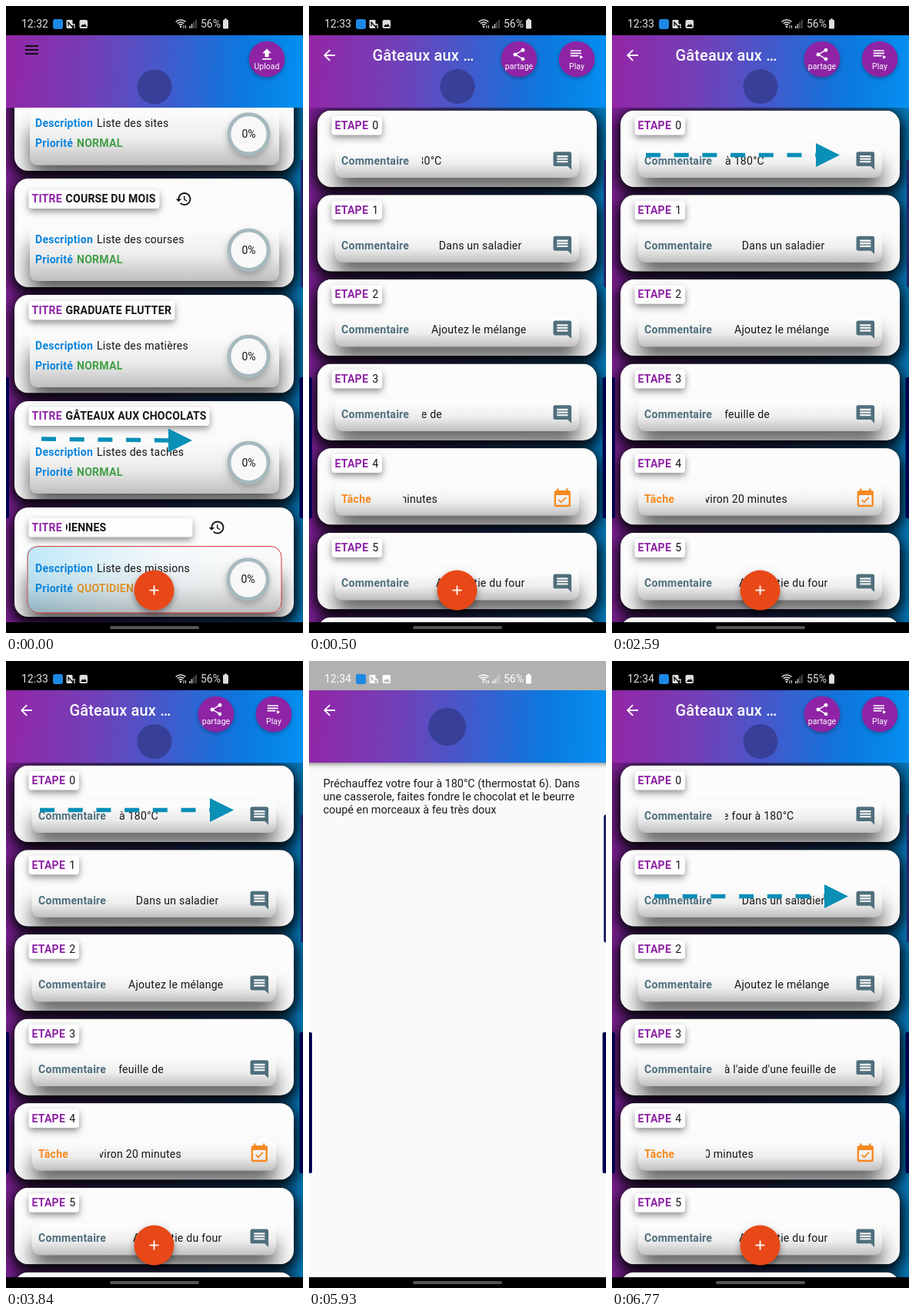
Write an HTML page with a canvas that moves like this. It is 386x814 px and loops after 8000 ms.

```html
<!DOCTYPE html>
<html lang="fr">
<head>
<meta charset="utf-8">
<title>Liste de tâches</title>
<style>
html, body { margin: 0; width: 100%; height: 100%; overflow: hidden; background: #000; }
canvas { display: block; width: 386px; height: 814px; }
</style>
</head>
<body>
<canvas id="stage"></canvas>
<script>
const W = 386, H = 814, LOOP = 8000;
const canvas = document.getElementById('stage');
const c = canvas.getContext('2d');
const dpr = window.devicePixelRatio || 1;
canvas.width = W * dpr;
canvas.height = H * dpr;
c.scale(dpr, dpr);

const PURPLE = '#8e24a5', BLUE = '#0a84dc', GREEN = '#43a047', AMBER = '#dd9330',
  ORANGE = '#f5891f', SLATE = '#4f6f7d', INK = '#161616', WHITE = '#fff';

// 24-unit icon outlines
const ICON = {
  history: 'M13 3c-4.97 0-9 4.03-9 9H1l3.89 3.89.07.14L9 12H6c0-3.87 3.13-7 7-7s7 3.13 7 7-3.13 7-7 7c-1.93 0-3.68-.79-4.94-2.06l-1.42 1.42C8.27 19.99 10.51 21 13 21c4.97 0 9-4.03 9-9s-4.03-9-9-9zm-1 5v5l4.28 2.54.72-1.21-3.5-2.08V8z',
  upload: 'M9 16h6v-6h4l-7-7-7 7h4zm-4 2h14v2H5z',
  play: 'M19 9H2v2h17zm0-4H2v2h17zM2 15h13v-2H2zm15-2v6l5-3z',
  back: 'M20 11H7.83l5.59-5.59L12 4l-8 8 8 8 1.41-1.41L7.83 13H20z',
  comment: 'M22 4c0-1.1-.9-2-2-2H4c-1.1 0-2 .9-2 2v12c0 1.1.9 2 2 2h14l4 4zM18 14H6v-2h12zm0-3H6V9h12zm0-3H6V6h12z',
  event: 'M16.53 11.06L15.47 10l-4.88 4.88-2.12-2.12-1.06 1.06L10.59 17zM19 3h-1V1h-2v2H8V1H6v2H5c-1.1 0-2 .9-2 2v14c0 1.1.9 2 2 2h14c1.1 0 2-.9 2-2V5c0-1.1-.9-2-2-2zm0 16H5V8h14z'
};
for (const name in ICON) ICON[name] = new Path2D(ICON[name]);

function box(x, y, w, h, r, fill) {
  c.beginPath();
  c.roundRect(x, y, w, h, r);
  c.fillStyle = fill;
  c.fill();
}

function disc(x, y, r, fill) {
  c.beginPath();
  c.arc(x, y, r, 0, Math.PI * 2);
  c.fillStyle = fill;
  c.fill();
}

function line(points, color, width) {
  c.beginPath();
  points.forEach(([x, y]) => c.lineTo(x, y));
  c.strokeStyle = color;
  c.lineWidth = width;
  c.stroke();
}

function shadow(color, blur, dy, draw) {
  c.save();
  c.shadowColor = color;
  c.shadowBlur = blur * dpr;
  c.shadowOffsetY = dy * dpr;
  draw();
  c.restore();
}

function gradient(x0, y0, x1, y1, ...stops) {
  const g = c.createLinearGradient(x0, y0, x1, y1);
  stops.forEach(([at, color]) => g.addColorStop(at, color));
  return g;
}

// y is the middle of the capitals
function text(s, x, y, color = INK, { weight = 400, size = 14.07, space = 0.234, align = 'left' } = {}) {
  c.font = `${weight} ${size}px Roboto, sans-serif`;
  c.letterSpacing = space + 'px';
  c.textAlign = align;
  c.fillStyle = color;
  c.fillText(s, x, y + size * 0.355);
}

const bold = (s, x, y, color, align) => text(s, x, y, color, { weight: 700, align });

function icon(name, cx, cy, scale, color) {
  c.save();
  c.translate(cx - 12 * scale, cy - 12 * scale);
  c.scale(scale, scale);
  c.fillStyle = color;
  c.fill(ICON[name], 'evenodd');
  c.restore();
}

function clipped(x, y, w, h, r, draw) {
  c.save();
  c.beginPath();
  c.roundRect(x, y, w, h, r);
  c.clip();
  draw();
  c.restore();
}

function statusBar(time, battery, bg) {
  c.fillStyle = bg;
  c.fillRect(0, 0, W, 38);
  const fg = bg === '#000' ? '#dedede' : WHITE;
  const plain = { size: 14, space: 0 };
  text(time, 20, 23.5, fg, plain);
  box(61, 17, 13, 13, 3, '#1e88e5');

  box(78.5, 18, 8, 11, 1, fg);
  line([[81, 26], [81, 21], [88, 29]], bg, 1.2);
  line([[85, 24], [89, 24], [89, 29]], fg, 1.3);

  box(95.5, 18, 10.5, 11, 2, fg);
  c.beginPath();
  c.moveTo(97, 27); c.lineTo(99.5, 23.5); c.lineTo(101, 25); c.lineTo(102.5, 23); c.lineTo(105, 27);
  c.fillStyle = bg;
  c.fill();

  for (const r of [3, 6, 9]) {
    c.beginPath();
    c.arc(227, 27, r, -2.35, -0.79);
    c.strokeStyle = fg;
    c.lineWidth = 1.5;
    c.stroke();
  }
  disc(227, 27, 1.3, fg);
  line([[231, 25], [231, 29]], fg, 1);
  line([[233.5, 25], [233.5, 29]], fg, 1);
  for (let i = 0; i < 4; i++) {
    c.globalAlpha = i < 2 ? 0.9 : 0.4;
    c.fillStyle = fg;
    c.fillRect(238 + i * 2.7, 26 - i * 2.7, 1.6, 3 + i * 2.7);
  }
  c.globalAlpha = 1;
  text(battery, 253, 23.5, fg, plain);
  box(282, 18, 7, 11.5, 1, fg);
  c.fillStyle = fg;
  c.fillRect(284, 16.5, 3, 2);
}

function header(logoX, logoY, r) {
  c.fillStyle = gradient(0, 40, W, 62, [0, '#9326a6'], [0.3, '#7240b8'], [0.55, '#405bcc'],
    [0.8, '#0b78df'], [1, '#058ff0']);
  c.fillRect(0, 38, W, 94);
  disc(logoX, logoY, r, '#383f98');
}

function roundButton(x, label, name) {
  shadow('rgba(0,0,0,.3)', 5, 2, () => disc(x, 69, 23.3, PURPLE));
  icon(name, x, 63, 0.83, WHITE);
  text(label, x, 78, WHITE, { size: 10.5, space: 0.05, align: 'center' });
}

function backdrop() {
  c.fillStyle = gradient(0, 0, W, 0, [0, '#7c1e92'], [0.5, '#3c3f98'], [1, '#0277b6']);
  c.fillRect(0, 132, W, 668);
}

function sideHandles() {
  box(-4, 482, 8, 183, 2, '#00004e');
  box(381.5, 482, 9, 183, 2, '#00004e');
  box(383, 199.5, 8, 166, 3, '#23246c');
}

function navBar() {
  c.fillStyle = '#000';
  c.fillRect(0, 800, W, 14);
  box(135, 805, 116, 4, 2, '#555');
}

function addButton() {
  shadow('rgba(0,0,0,.4)', 8, 4, () => disc(192.5, 758.5, 26, '#e84817'));
  line([[186.5, 758.5], [198.5, 758.5]], WHITE, 1.8);
  line([[192.5, 752.5], [192.5, 764.5]], WHITE, 1.8);
}

function cardShadows(cards) {
  for (let pass = 0; pass < 2; pass++)
    for (const [top, h] of cards)
      shadow('rgba(0,0,0,.9)', 20, 6, () => box(11, top, 363, h, 18, '#000'));
}

// White card holding a raised, shaded panel
function card(top, h, panel, tint = '#fbfbfb') {
  const [x, y, w, ph] = panel;
  clipped(11, top, 363, h, 18, () => {
    c.fillStyle = '#fcfcfc';
    c.fillRect(11, top, 363, h);
    shadow('rgba(0,0,0,.68)', 26, 15, () => box(x, y + ph * 0.25, w, ph * 0.75, 9, '#888'));
    box(x, y, w, ph, 9, tint);
    box(x, y, w, ph, 9, gradient(0, y, 0, y + ph, [0.2, 'rgba(0,0,0,0)'], [0.6, 'rgba(0,0,0,.06)'], [1, 'rgba(0,0,0,.24)']));
  });
}

function chip(y, w) {
  shadow('rgba(0,0,0,.42)', 9, 4, () => box(29.5, y - 12, w, 24.5, 4, '#fdfdfd'));
}

function arrow(x, y, len, slope) {
  const color = '#0a8fb6', end = y + slope;
  c.setLineDash([19, 17.7]);
  line([[x, y], [x + len, end]], color, 5.5);
  c.setLineDash([]);
  c.beginPath();
  c.moveTo(x + len, end - 15.5);
  c.lineTo(x + len + 31, end);
  c.lineTo(x + len, end + 15.5);
  c.fillStyle = color;
  c.fill();
}

const LISTS = [
  { top: 100, bottom: 214, desc: 152.5, note: 'Liste des sites' },
  { top: 224, bottom: 365, title: 250.5, name: 'COURSE DU MOIS', chip: 170, desc: 303, note: 'Liste des courses', clock: 231 },
  { top: 375, bottom: 502.5, title: 395, name: 'GRADUATE FLUTTER', chip: 190, desc: 441, note: 'Liste des matières' },
  { top: 513, bottom: 640.5, title: 532.5, name: 'GÂTEAUX AUX CHOCOLATS', chip: 235, desc: 579, note: 'Listes des taches' },
  { top: 651, bottom: 793, title: 677, name: 'TÂCHES QUOTIDIENNES', chip: 213, desc: 730.5, note: 'Liste des missions', clock: 274, daily: true }
];

function listCard({ top, bottom, title, name, chip: w, desc, note, clock, daily }) {
  const tint = daily ? gradient(28, 0, 358, 0, [0, '#bfe8f8'], [0.3, '#dff2f9'], [0.55, '#f4f8fa'], [1, '#fafafa']) : undefined;
  card(top, bottom - top, daily ? [27, desc - 29, 331, 86] : [31, desc - 29, 324, 83], tint);
  if (daily) {
    c.beginPath();
    c.roundRect(28, 701.5, 330, 86.5, 14);
    c.strokeStyle = '#d8383c';
    c.lineWidth = 1;
    c.stroke();
  }
  if (title) {
    chip(title, w);
    bold('TITRE', 33.5, title, PURPLE);
    if (daily) clipped(78, title - 10, 160, 20, 0, () => bold(name, 130.5, title, INK, 'right'));
    else bold(name, 77.5, title, INK);
  }
  if (clock) icon('history', clock, title, 0.94, INK);
  bold('Description', 38, desc, BLUE);
  text(note, 118, desc);
  bold('Priorité', 38, desc + 25.6, BLUE);
  bold(daily ? 'QUOTIDIEN' : 'NORMAL', 92, desc + 25.6, daily ? AMBER : GREEN);
  const rx = daily ? 314.5 : 315.5, ry = desc + 13.8;
  shadow('rgba(0,0,0,.28)', 10, 4, () => disc(rx, ry, 27.5, '#f8f8f8'));
  c.beginPath();
  c.arc(rx, ry, 25.6, 0, Math.PI * 2);
  c.strokeStyle = '#a6b9be';
  c.lineWidth = 4.8;
  c.stroke();
  text('0%', rx, ry, INK, { align: 'center', size: 14, space: 0 });
}

function listPage() {
  backdrop();
  cardShadows(LISTS.map(l => [l.top, l.bottom - l.top]));
  sideHandles();
  LISTS.forEach(listCard);
  header(193, 105, 22.5);
  for (const y of [52, 57, 62]) line([[25, y], [42, y]], '#111', 2);
  roundButton(339, 'Upload', 'upload');
  arrow(46, 562, 165, 2);
  addButton();
  statusBar('12:32', '56%', '#000');
  navBar();
}

const STEPS = [
  'Préchauffez votre four à 180°C',
  'Dans un saladier',
  'Ajoutez le mélange',
  "à l'aide d'une feuille de",
  'Cuire environ 20 minutes',
  'A la sortie du four',
  ''
];
const PITCH = 109.65;

// ends: right edge of each step's scrolling text
function recipePage(time, battery, ends, pointer) {
  backdrop();
  cardShadows(STEPS.map((_, i) => [135.5 + i * PITCH, 99.5]));
  sideHandles();
  STEPS.forEach((step, i) => {
    const dy = i * PITCH, y = 201 + dy, task = i === 4;
    card(135.5 + dy, 99.5, [34, 180 + dy, 317, 43]);
    chip(155 + dy, 65.5);
    bold('ETAPE', 33.5, 155 + dy, PURPLE);
    text(String(i), 82.3, 155 + dy);
    bold(task ? 'Tâche' : 'Commentaire', 42, y, task ? ORANGE : SLATE);
    clipped(task ? 122 : 147, y - 12, 160, 24, 0, () =>
      text(step, ends[i], y, INK, { align: 'right' }));
    icon(task ? 'event' : 'comment', 329.3, y, 1.18, task ? ORANGE : SLATE);
  });
  header(193, 104.5, 22.5);
  icon('back', 26.5, 64, 0.94, WHITE);
  text('Gâteaux aux …', 82.5, 64, WHITE, { weight: 500, size: 20, space: 0.15 });
  roundButton(273, 'partage', 'upload_share');
  roundButton(348, 'Play', 'play');
  if (pointer) arrow(pointer[0], pointer[1], 221, 0);
  addButton();
  statusBar(time, battery, '#000');
  navBar();
}
ICON.upload_share = new Path2D('M18 16.08c-.76 0-1.44.3-1.96.77L8.91 12.7c.05-.23.09-.46.09-.7s-.04-.47-.09-.7l7.05-4.11c.54.5 1.25.81 2.04.81 1.66 0 3-1.34 3-3s-1.34-3-3-3-3 1.34-3 3c0 .24.04.47.09.7L8.04 9.81C7.5 9.31 6.79 9 6 9c-1.66 0-3 1.34-3 3s1.34 3 3 3c.79 0 1.5-.31 2.04-.81l7.12 4.16c-.05.21-.08.43-.08.65 0 1.61 1.31 2.92 2.92 2.92s2.92-1.31 2.92-2.92-1.31-2.92-2.92-2.92z');

function notePage() {
  c.fillStyle = '#fafafa';
  c.fillRect(0, 38, W, 762);
  shadow('rgba(0,0,0,.45)', 6, 2, () => { c.fillStyle = '#555'; c.fillRect(-10, 60, W + 20, 72); });
  header(179.5, 85.5, 24.5);
  icon('back', 26.5, 64, 0.94, WHITE);
  [
    'Préchauffez votre four à 180°C (thermostat 6). Dans',
    'une casserole, faites fondre le chocolat et le beurre',
    'coupé en morceaux à feu très doux'
  ].forEach((s, i) => text(s, 18.5, 159 + i * 17, '#1c1c1c', { size: 14.45, space: 0 }));
  sideHandles();
  statusBar('12:34', '56%', '#b1b1b1');
  navBar();
}

const SCENES = [
  [0, listPage],
  [500, () => recipePage('12:33', '56%', [172.5, 276.5, 282.5, 173, 167, 280.5, 0])],
  [2590, () => recipePage('12:33', '56%', [198, 276.5, 282.5, 205, 228, 280.5, 0], [44, 193.5])],
  [4680, notePage],
  [6770, () => recipePage('12:34', '55%', [236.5, 276.5, 282.5, 291.5, 184, 280.5, 0], [55, 305.5])]
];

const start = performance.now();
let shown = null;

function tick() {
  const t = (performance.now() - start) % LOOP;
  const scene = SCENES.filter(([at]) => at <= t).pop();
  if (scene !== shown) {
    shown = scene;
    c.clearRect(0, 0, W, H);
    scene[1]();
  }
  requestAnimationFrame(tick);
}
tick();
</script>
</body>
</html>
```
